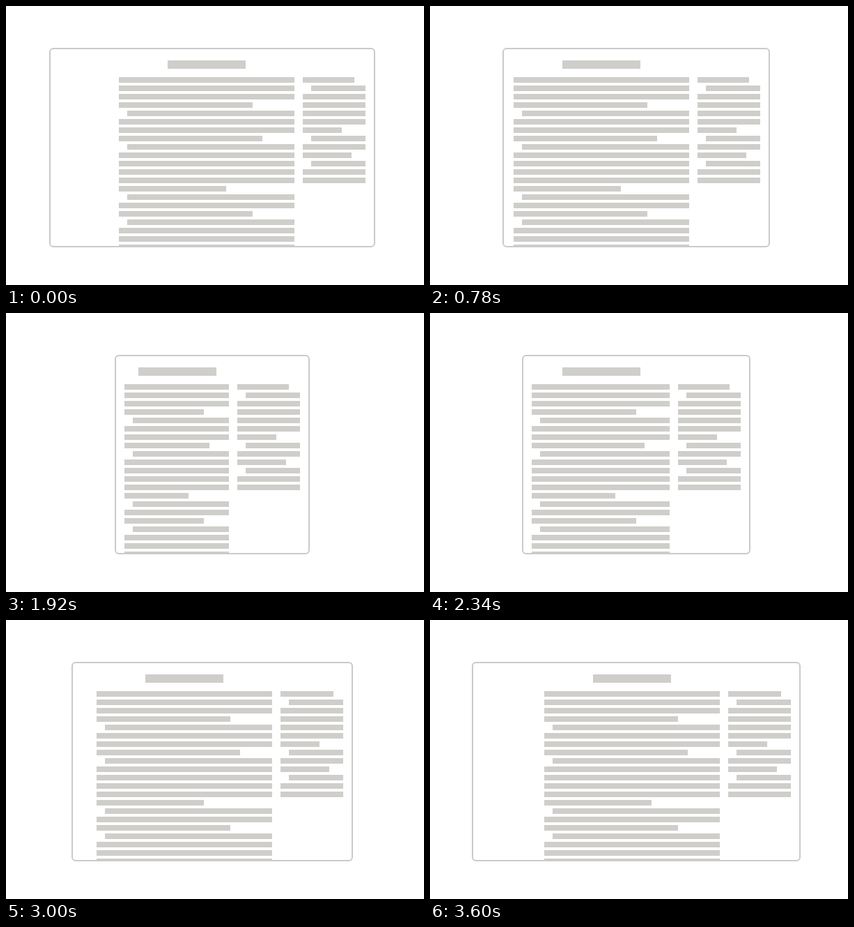
Write an HTML page with a canvas that moves like this. It is 600 by 400 pixels and loops after 3.66 s.

```html
<!DOCTYPE html>
<html lang="en">
<head>
<meta charset="utf-8">
<title>Responsive page</title>
<style>
  html, body { margin: 0; width: 100%; height: 100%; overflow: hidden; background: #fff; }
  canvas { display: block; }
</style>
</head>
<body>
<canvas id="stage" width="600" height="400"></canvas>
<script>
const ctx = document.getElementById('stage').getContext('2d');
const LOOP = 3660, STEP = 60, AXIS = 592;
const TOP = 60, BOTTOM = 346, INK = '#cfcecb', EDGE = '#cacaca';

// Left edge of the window over time: [ms, px]
const path = [[0, 62], [540, 88.2], [780, 103.8], [1380, 138], [1800, 162],
  [1920, 156], [2700, 111.2], [3000, 93.6], [3600, 59.6]];

// Row number -> width share of a paragraph's last line; the next row is indented
const mainEnds = { 3: 0.76, 7: 0.815, 13: 0.61, 16: 0.76 };
const sideEnds = { 0: 0.83, 6: 0.62, 9: 0.77 };

const snap = v => Math.round(v / 2) * 2;

function leftAt(t) {
  const i = Math.max(1, path.findIndex(p => p[0] >= t));
  const [t0, x0] = path[i - 1], [t1, x1] = path[i];
  return x0 + (x1 - x0) * (t - t0) / (t1 - t0);
}

function bar(x0, x1, y, h) {
  const x = snap(x0);
  ctx.fillRect(x, y, snap(x1) - x, h);
}

function column(x, width, rows, ends) {
  for (let i = 0; i < rows; i++) {
    const indent = (i - 1) in ends ? 12 : 0;
    bar(x + indent, x + width * (ends[i] || 1), 102 + i * 12, 8);
  }
}

function draw(t) {
  const left = leftAt(t), right = AXIS - left;
  const mainWidth = Math.min(252, right - left - 130);
  const mainX = right - 116 - mainWidth;
  const titleX = snap(mainX + mainWidth / 2 - 56);
  const x = snap(left), width = AXIS - 2 * x;

  ctx.clearRect(0, 0, 600, 400);
  ctx.save();
  ctx.beginPath();
  ctx.rect(x, TOP, width, BOTTOM - TOP - 1);
  ctx.clip();
  ctx.fillStyle = INK;
  ctx.fillRect(titleX, 78, 112, 12);
  column(mainX, mainWidth, 21, mainEnds);
  column(right - 104, 90, 13, sideEnds);
  ctx.restore();

  ctx.strokeStyle = EDGE;
  ctx.lineWidth = 2;
  ctx.beginPath();
  ctx.roundRect(x + 1, TOP + 1, width - 2, BOTTOM - TOP - 2, 5);
  ctx.stroke();
}

function tick() {
  const t = performance.now() % LOOP;
  draw(Math.floor(t / STEP) * STEP);
  requestAnimationFrame(tick);
}
tick();
</script>
</body>
</html>
```
